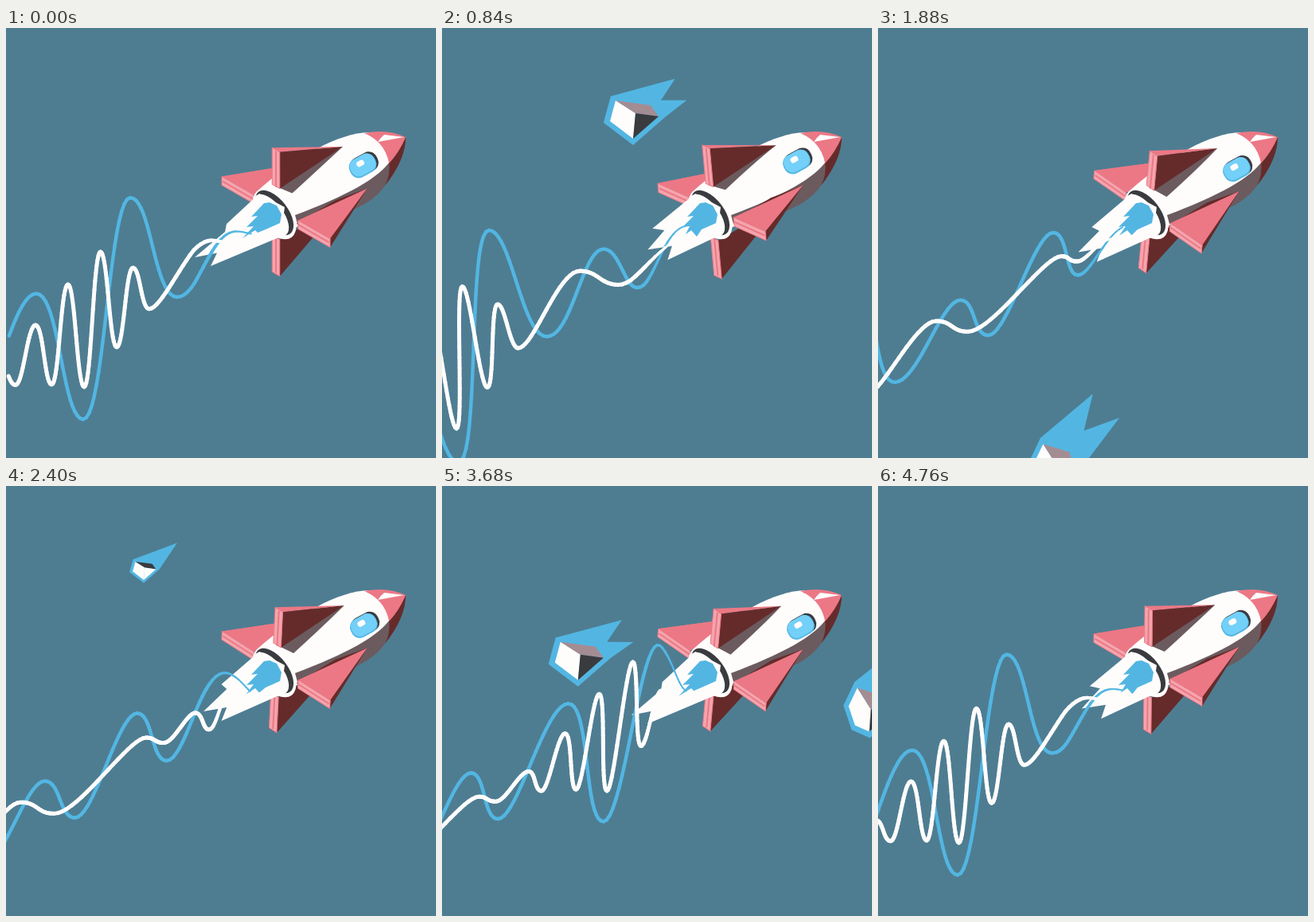
An HTML page with a canvas for the animation above (4.8 s loop, 540x540 px).

```html
<!DOCTYPE html>
<html lang="en">
<head>
<meta charset="utf-8">
<title>Rocket</title>
<style>
html, body { margin: 0; width: 100%; height: 100%; overflow: hidden; background: #4e7d92; }
canvas { display: block; width: 540px; height: 540px; }
</style>
</head>
<body>
<canvas id="stage" width="540" height="540"></canvas>
<script>
const ctx = document.getElementById('stage').getContext('2d');
const LOOP = 4800, STEP = 40, RUN = 490, RISE = 276, PULSES = 17;
const C = {
  sky: '#4e7d92', white: '#fffdfc', blue: '#53b6e2', glass: '#73d0f9', pink: '#ec7885',
  pale: '#f4a5ad', maroon: '#652b2a', shade: '#6b5b5f', dark: '#3a3b3f', stone: '#a48c93'
};

const lerp = (a, b, k) => a + (b - a) * k;
const mix = (p, q, k) => [lerp(p[0], q[0], k), lerp(p[1], q[1], k)];
const polar = (r, a) => [r * Math.cos(a), r * Math.sin(a)];

function poly(color, pts) {
  ctx.fillStyle = color;
  ctx.beginPath();
  pts.forEach(p => ctx.lineTo(...p));
  ctx.fill();
}

function line(color, width, pts) {
  ctx.strokeStyle = color;
  ctx.lineWidth = width;
  ctx.beginPath();
  pts.forEach(p => ctx.lineTo(...p));
  ctx.stroke();
}

function shape(color, d) {
  ctx.fillStyle = color;
  ctx.fill(new Path2D(d));
}

function oval(color, x, y, rx, ry) {
  ctx.fillStyle = color;
  ctx.beginPath();
  ctx.ellipse(x, y, rx, ry, 0.92, 0, Math.PI * 2);
  ctx.fill();
}

function pill(color, x, y, w, h, radius) {
  ctx.save();
  ctx.translate(x, y);
  ctx.rotate(-0.5);
  ctx.fillStyle = color;
  ctx.beginPath();
  ctx.roundRect(-w / 2, -h / 2, w, h, radius);
  ctx.fill();
  ctx.restore();
}

// ---- Trails: crests and troughs as heights over a sloping axis.
const axisY = x => 436 - x * RISE / RUN;
const burst = (x, gap, heights) => heights.map((h, i) => [x + gap * i, h]);
const blueWave = [
  ...burst(38, 59, [81, -110, 135, -23]),
  ...burst(292, 115, [40, 61]),
  ...burst(333, 115, [-31, -24])
].sort((a, b) => a[0] - b[0]);
const whiteWave = [
  ...burst(37, 20.4, [42, -44, 70, -70, 88, -43, 45, -18]),
  [262, 30], [306, -10], [420, 22], [443, 2], [483, 18], [502, -19]
];

function drawTrail(color, wave, t, roll, width, end) {
  const k = t / LOOP, start = 3 - RUN * k;
  const knots = [-1, 0, 1, 2].flatMap(n => wave.map(([x, h]) => {
    const px = x + RUN * (n - k);
    return [px, axisY(px) - h];
  }));
  const gap = i => knots[i + 1][0] - knots[i][0];
  const reach = (i, j) => Math.min(0.5 * gap(i), 0.45 * Math.sqrt(gap(i) * gap(j)));
  ctx.lineCap = 'round';
  let last = null;
  for (let i = 1; i + 2 < knots.length; i++) {
    const [x0, y0] = knots[i], [x1, y1] = knots[i + 1];
    if (x1 < -60) continue;
    const c0 = x0 + reach(i, i - 1), c1 = x1 - reach(i, i + 1);
    for (let s = 0; s < 20; s++) {
      const u = s / 20, v = 1 - u;
      const rawX = v * v * v * x0 + 3 * u * v * (v * c0 + u * c1) + u * u * u * x1;
      if (rawX < start) continue;
      if (rawX > end) return;
      const rawY = lerp(y0, y1, u * u * (3 - 2 * u));
      const axis = axisY(rawX);
      // Waves swell as they leave the nozzle and lean with the roll.
      const h = (axis - rawY) * Math.min(1, (330 - rawX) / 95);
      const p = [rawX + h * roll * 0.0105, axis - h + h * roll * 0.007];
      const thin = Math.max(0.45, Math.min(1, (330 - p[0]) / 75));
      if (last) line(color, width * thin, [last, p]);
      last = p;
    }
  }
}

// ---- Meteors: a rim of corners around one inner corner.
const FLAT = { inner: [3, -3], rim: [[-22, -19], [22, -13], [32, 1], [0, 29], [-29, 7]] };
const STEEP = { inner: [5, 0], rim: [[-12, -27], [21, -17], [27, 4], [3, 28], [-15, 20], [-23, -4]] };
const meteors = [
  { rock: FLAT, time: 840, pos: [240, 110], v: [-333, 182], tail: 70 },
  { rock: STEEP, time: 1440, pos: [391, 358], v: [-390, 435], tail: 103 },
  { rock: FLAT, time: 2400, pos: [173, 104], v: [-330, 256], tail: 53, tiny: true },
  { rock: FLAT, time: 3240, pos: [371, 110], v: [-455, 238], tail: 72 },
  { rock: STEEP, time: 4120, pos: [362, 472], v: [-390, 435], tail: 97 }
];

function drawMeteor({ rock, time, pos, v, tail, tiny }, t) {
  const dt = (t - time) / 1000, size = tiny ? 0.48 : 1, spread = tiny ? 0 : 0.22;
  const scaled = k => rock.rim.map(([x, y]) => [x * k, y * k]);
  const [top, right, corner, ...rest] = scaled(size);
  const inner = rock.inner.map(n => n * size);
  const [hullTop, , ...hull] = scaled(size * 1.28);
  const back = Math.atan2(-v[1], -v[0]);
  ctx.save();
  ctx.translate(pos[0] + v[0] * dt, pos[1] + v[1] * dt);
  poly(C.blue, [...hull, hullTop,
    polar(tail, back - spread), polar(tail * 0.57, back), polar(tail, back + spread)]);
  poly(C.white, [top, inner, ...rest]);
  poly(tiny ? C.dark : C.stone, [top, right, corner, inner]);
  poly(tiny ? C.white : C.dark, [inner, corner, rest[0]]);
  ctx.restore();
}

// ---- Rocket
function rollAt(t) {
  const w = t / LOOP * Math.PI * 2;
  return 2 - 2 * Math.cos(w) - 4.1 * Math.sin(w) - 6.6 * Math.sin(2 * w);
}

// Screen point of a fin: quarter turn, radius, sideways offset, distance ahead.
function finPoint(roll, quarter, radius, side, ahead) {
  const a = quarter * Math.PI / 2 + roll * 0.014;
  const cos = Math.cos(a), sin = Math.sin(a);
  const p = radius * cos - side * sin, q = radius * sin + side * cos;
  return [339 - 68 * p + 84 * ahead, 231 - 39 * p - 78 * q - 47 * ahead];
}

function drawFin(roll, quarter, side, face, rim) {
  const at = (r, s, ahead = 0) => finPoint(roll, quarter, r, s * 0.07, ahead);
  const apex = at(0.45, 0, 1);
  const strip = [at(1, -1), at(1, 1), at(0.41, 1), at(0.41, -1)];
  poly(rim, [at(1, -1), at(1, 1), apex]);
  poly(face, [at(1, side), apex, at(0.41, side)]);
  poly(C.pale, strip);
  line(C.pink, 1, [...strip, strip[0]]);
  line(C.pink, 2, [at(0.97, 0), at(0.41, 0)]);
}

function drawFinShadows(roll) {
  const apex = finPoint(roll, 1, 0.45, 0, 1);
  const bend = finPoint(roll, 1, 0.58, 0.25, 0.5);
  const foot = finPoint(roll, 1, 0.45, 0.3, 0);
  ctx.fillStyle = C.shade;
  ctx.beginPath();
  ctx.moveTo(...apex);
  ctx.quadraticCurveTo(...bend, ...foot);
  ctx.lineTo(...finPoint(roll, 1, 0.41, 0, 0));
  ctx.fill();
  poly(C.maroon, [finPoint(roll, 3 - 1, 0.38, 0, 0), finPoint(roll, 2, 0.35, 0, 0.6),
    finPoint(roll, 2, 0.45, 0, 1), finPoint(roll, 2, 1, 0, 0)]);
}

function drawBody() {
  shape(C.white, 'M456 131C418 132 366 160 314 206L364 250C425 238 468 216 483 178Q482 146 456 131Z');
  shape(C.shade, 'M483 166C470 188 425 212 363 235L366 246C420 239 462 222 477 196Q489 180 483 166Z');
  shape(C.pink, 'M450 132Q478 126 502 137Q500 155 482 178Q480 145 450 132Z');
  shape(C.maroon, 'M502 137Q502 165 476 198Q483 184 481 170Q494 156 502 137Z');
  shape(C.white, 'M500 137L475 134Q470 138 467 143Z');
}

function drawNozzle() {
  oval(C.white, 337, 234, 36, 21);
  oval(C.dark, 337, 232, 33, 17);
  oval(C.white, 333, 235, 31, 15);
}

function drawWindow(roll) {
  const x = 449 + roll * 0.33, y = 172 + roll * 0.62;
  pill(C.dark, x + 1, y - 1, 36, 25, 11);
  pill(C.blue, x - 1, y + 1, 35, 25, 11);
  pill(C.glass, x - 1, y, 33, 23, 10);
  pill(C.white, x - 4, y - 2, 10, 7, 3);
}

// Tongues leap out and shrink back on every pulse.
function drawFlame(t) {
  const k = t / LOOP * PULSES % 1;
  const upper = mix([277, 246], [264, 252], k);
  const middle = mix([237, 288], [259, 278], k);
  const lower = mix([257, 299], [284, 291], k);
  const notch = (a, b) => [(a[0] + b[0]) / 2 + 18, (a[1] + b[1]) / 2 - 11];
  poly(C.white, [[318, 208], upper, notch(upper, middle), middle,
    notch(middle, lower), lower, [345, 262], [350, 225]]);
  poly(C.blue, [[324, 220], [308, 237], [316, 236], [302, 250], [311, 249],
    mix([297, 264], [306, 259], k), [313, 254], mix([316, 257], [320, 262], k),
    [326, 253], [344, 245], [346, 234], [340, 223], [331, 219]]);
}

function draw(t) {
  const roll = rollAt(t);
  ctx.fillStyle = C.sky;
  ctx.fillRect(0, 0, 540, 540);
  meteors.forEach(m => drawMeteor(m, t));
  drawFin(roll, 0, 1, C.pink, C.pink);
  drawFin(roll, 3, -1, C.maroon, C.maroon);
  drawBody();
  drawFinShadows(roll);
  drawFin(roll, 1, 1, C.maroon, C.pink);
  drawFin(roll, 2, -1, C.pink, C.maroon);
  drawNozzle();
  drawWindow(roll);
  drawFlame(t);
  drawTrail(C.blue, blueWave, t, roll, 4.4, 308);
  drawTrail(C.white, whiteWave, t, roll, 5, 296);
}

const begin = performance.now();
function tick() {
  const t = (performance.now() - begin) % LOOP;
  draw(Math.floor(t / STEP) * STEP);
  requestAnimationFrame(tick);
}
tick();
</script>
</body>
</html>
```
